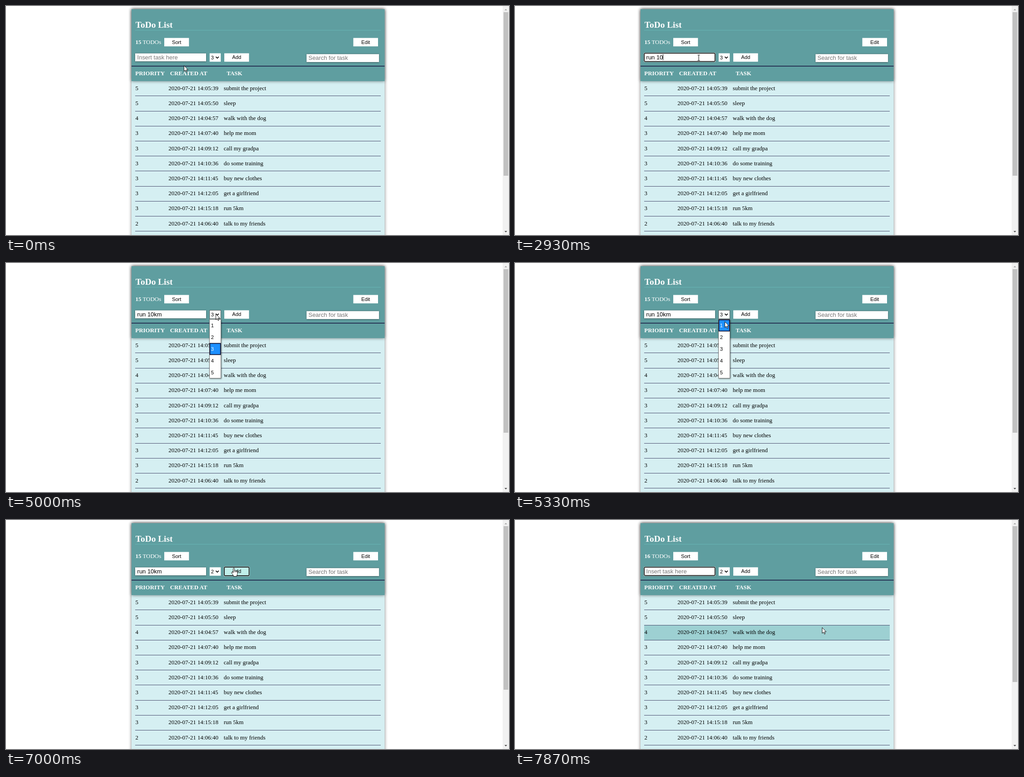
An HTML page that plays this animation: 1106x506 px, repeating every 8 s.

```html
<!DOCTYPE html>
<html lang="en">
<head>
<meta charset="utf-8">
<title>ToDo List</title>
<style>
html, body { margin: 0; width: 100%; height: 100%; overflow: hidden; background: #fff; }
svg { display: block; }
text { white-space: pre; }
.serif { font: 12.95px "Liberation Serif", "Times New Roman", serif; }
.bold { font-weight: bold; }
.title { font-size: 19.4px; }
.field { font: 12.95px "Liberation Sans", Arial, sans-serif; }
.small { font: 11.1px "Liberation Sans", Arial, sans-serif; }
</style>
</head>
<body>
<svg width="1106" height="506" viewBox="0 0 1106 506">
  <defs>
    <filter id="wide" x="-10%" y="-20%" width="120%" height="140%"><feGaussianBlur stdDeviation="3.6"/></filter>
    <filter id="soft" x="-20%" y="-50%" width="140%" height="200%"><feGaussianBlur stdDeviation="1.6"/></filter>
  </defs>
  <g id="stage"></g>
</svg>
<script>
const STEPS = 120, LOOP = 8000, ROW = 33.2;
const stage = document.getElementById('stage');

const tasks = [
  [5, '05:39', 'submit the project'], [5, '05:50', 'sleep'],
  [4, '04:57', 'walk with the dog'], [3, '07:40', 'help me mom'],
  [3, '09:12', 'call my gradpa'], [3, '10:36', 'do some training'],
  [3, '11:45', 'buy new clothes'], [3, '12:05', 'get a girlfriend'],
  [3, '15:18', 'run 5km'], [2, '06:40', 'talk to my friends']
];

// Steps at which the caret restarts; each one after the first types a letter.
const keys = [8, 23, 25, 28, 31, 40, 44, 51, 54];
const phrase = 'run 10km';
const caretX = [288.5, 292.5, 299.7, 307, 310.5, 317.7, 325, 331.5, 342.3];

const OPEN = 75, CLOSE = 85, PRESS = 105, ADDED = 107;

// Pointer waypoints: step, x, y
const path = [
  [0, 391, 131], [1, 391, 131], [8, 403.5, 114], [11, 403.5, 114], [12, 404, 114],
  [61, 404, 114], [65, 607, 4], [66, 623, 7], [70, 560, 70], [74, 461, 112],
  [77, 461, 112], [80, 461, 129], [83, 461, 162], [85, 461, 162], [90, 461, 158],
  [96, 496, 96], [97, 496, 96], [99, 501, 106.5], [107, 501, 106.5], [110, 590, 38],
  [111, 610, 38], [114, 690, 100], [116, 707, 190], [117, 692, 237], [118, 675, 237]
];

function pointer(n) {
  const i = path.findIndex(p => p[0] > n);
  if (i < 0) return path.at(-1).slice(1);
  const [a, x, y] = path[i - 1], [b, u, v] = path[i], f = (n - a) / (b - a);
  return [x + (u - x) * f, y + (v - y) * f];
}

const rect = (x, y, w, h, fill, more = '') =>
  `<rect x="${x}" y="${y}" width="${w}" height="${h}" fill="${fill}" ${more}/>`;
const text = (x, y, s, cls, fill = '#000', more = '') =>
  `<text x="${x}" y="${y}" class="${cls}" fill="${fill}" ${more}>${s}</text>`;
const shadow = (x, y, w, h, blur, alpha) =>
  rect(x, y, w, h, '#000', `opacity="${alpha}" filter="url(#${blur})"`);
const inside = ([px, py], x, y, w, h) => px >= x && px < x + w && py >= y && py < y + h;

function ring(x, y, w, h, fill) {
  return rect(x - 1.3, y - 1.3, w + 2.6, h + 2.6, '#fff', 'rx="2.5"') +
    rect(x, y, w, h, fill, 'rx="1.5" stroke="#101010" stroke-width="1.7"');
}

function button(x, y, label, fill = '#fff', focused = false) {
  return (focused ? ring(x, y - .4, 54.5, 19, fill) : rect(x, y, 54.3, 18.6, fill)) +
    text(x + 27.2, y + 12.9, label, 'small', '#000', 'text-anchor="middle"');
}

function header(n) {
  return shadow(276, 7, 556.5, 159, 'wide', .5) +
    rect(276, 7, 556.5, 159, '#5f9ea0') +
    text(284.8, 47.8, 'ToDo List', 'serif bold title', '#fff') +
    rect(284, 53, 540, 1, '#68b5b4') +
    text(284.5, 83.5, `<tspan class="bold">${n < ADDED ? 15 : 16}</tspan> TODOs`, 'serif', '#fff') +
    button(348, 70.6, 'Sort') + button(763.7, 70.6, 'Edit') +
    rect(276, 132, 556.5, 1.6, '#191943') +
    text(284.3, 153, 'PRIORITY', 'serif bold', '#fff') +
    text(360.7, 153, 'CREATED AT', 'serif bold', '#fff') +
    text(485.3, 153, 'TASK', 'serif bold', '#fff');
}

function list(at) {
  let s = shadow(276, 7, 556.5, 520, 'wide', .5) + rect(276, 7, 556.5, 500, '#d5eff2');
  tasks.forEach(([level, time, name], i) => {
    const top = 165.2 + ROW * i, line = Math.round(top + ROW);
    if (inside(at, 284, top + 1, 540, ROW)) {
      s += rect(284, Math.round(top) + 1, 540, line - Math.round(top) - 1, '#9dd0d2');
    }
    s += rect(284, line, 540, 1, '#4a4e70') +
      text(284.5, top + 20.5, level, 'serif') +
      text(357.3, top + 20.5, '2020-07-21 14:' + time, 'serif') +
      text(478.8, top + 20.5, name, 'serif');
  });
  return s;
}

function inputs(n) {
  const focused = n >= keys[0] && n < OPEN || n >= ADDED;
  const typed = n < ADDED ? keys.filter(k => k <= n).length - 1 : 0;
  const last = n < ADDED ? keys[Math.max(typed, 0)] : ADDED;
  let s = shadow(284, 105, 156, 18, 'soft', .55) +
    (focused ? ring(284.3, 104.4, 155.4, 18.2, '#fff') : rect(284, 104.7, 156, 17.6, '#fff'));
  s += typed > 0
    ? text(288.6, 117.7, phrase.slice(0, typed), 'field')
    : text(288.6, 117.7, 'Insert task here', 'field', '#757575');
  if (focused && (n - last) % 16 < 8) s += rect(caretX[Math.max(typed, 0)], 106.5, 1, 13, '#000');
  return s + shadow(661, 106.5, 159, 18, 'soft', .55) +
    rect(660.8, 106.3, 159.4, 17.6, '#fff') +
    text(665, 119.2, 'Search for task', 'field', '#757575');
}

function picker(n) {
  const open = n >= OPEN && n < CLOSE;
  return (n >= CLOSE && n < PRESS
    ? ring(447.6, 104.4, 24.6, 18.8, '#fff')
    : rect(447.8, 104.5, 24.4, 18.6, '#fff', open ? 'stroke="#444" stroke-width=".8"' : '')) +
    text(450.8, 117.6, n < CLOSE ? 3 : 2, 'small') +
    '<path d="M461.4 112.2l3.2 3.1 3.2-3.1" fill="none" stroke="#000" stroke-width="1.7"/>';
}

function menu([, y]) {
  const hot = y < 125 ? 2 : Math.floor((y - 125) / 26);
  let s = shadow(448, 126, 26, 130, 'soft', .5) +
    rect(447.5, 124.5, 25, 130, '#fff', 'stroke="#777" stroke-width="1"');
  for (let i = 0; i < 5; i++) {
    const on = i === hot;
    if (on) s += rect(448.3, 125.6 + 26 * i, 23.4, 24.8, '#1e90ff', 'stroke="#101030" stroke-width="1.7"');
    s += text(450.8, 141.8 + 26 * i, i + 1, 'small', on ? '#fff' : '#000');
  }
  return s;
}

function scrollbar(n) {
  return rect(1092, 0, 14, 506, '#f1f1f1') +
    rect(1094, 13.5, 10.4, (n < ADDED ? 375 : 358) - 13.5, '#c1c1c1') +
    '<path d="M1096 9.6h6l-3-3.2z" fill="#a3a3a3"/><path d="M1096 497h6l-3 3.2z" fill="#505050"/>';
}

const shapes = {
  arrow: '<path d="M.4.6V13.4L3.3 10.7 5.3 15.2 7.2 14.4 5.3 10H9.3Z" fill="#fff" stroke="#000" stroke-width=".9"/>',
  beam: '<path d="M-2.4-5.7H-.6L0-5.2.6-5.7H2.4M0-5.2V5.9M-2.4 6.4H-.6L0 5.9.6 6.4H2.4" fill="none" stroke="#000"/>',
  hand: '<path d="M-1.4 9V1Q-1.4-.3 0-.3T1.4 1V5.5Q2.7 4.8 3.8 6 5 5.4 6 6.6 7.8 6.2 8 8.2V12Q8 14 6.6 15.5V18H-1V16.2Q-3 13-5 10.4-5.6 9-4.4 8.5-3 8-1.4 10Z" fill="#fff" stroke="#000" stroke-width=".9"/>' +
    '<path d="M1.4 5.5V9M3.8 6V9M6 6.6V9" stroke="#000" stroke-width=".8"/>'
};

function draw(n) {
  const at = pointer(n);
  const open = n >= OPEN && n < CLOSE;
  const onAdd = inside(at, 480, 104.5, 54.3, 18.6);
  const onInput = inside(at, 284, 104.5, 156, 18);
  const shape = onAdd ? 'hand' : onInput ? 'beam' : 'arrow';
  stage.innerHTML = list(at) + header(n) + inputs(n) + picker(n) +
    button(480, 104.5, 'Add', onAdd ? '#c0eee9' : '#fff', n >= PRESS && n < ADDED) +
    (open ? menu(at) : '') + scrollbar(n) +
    `<g transform="translate(${at[0]} ${at[1]})">${shapes[shape]}</g>`;
}

let shown = -1;
function tick() {
  const n = Math.floor((performance.now() % LOOP + 4) * STEPS / LOOP) % STEPS;
  if (n !== shown) draw(shown = n);
  requestAnimationFrame(tick);
}
tick();
</script>
</body>
</html>
```
